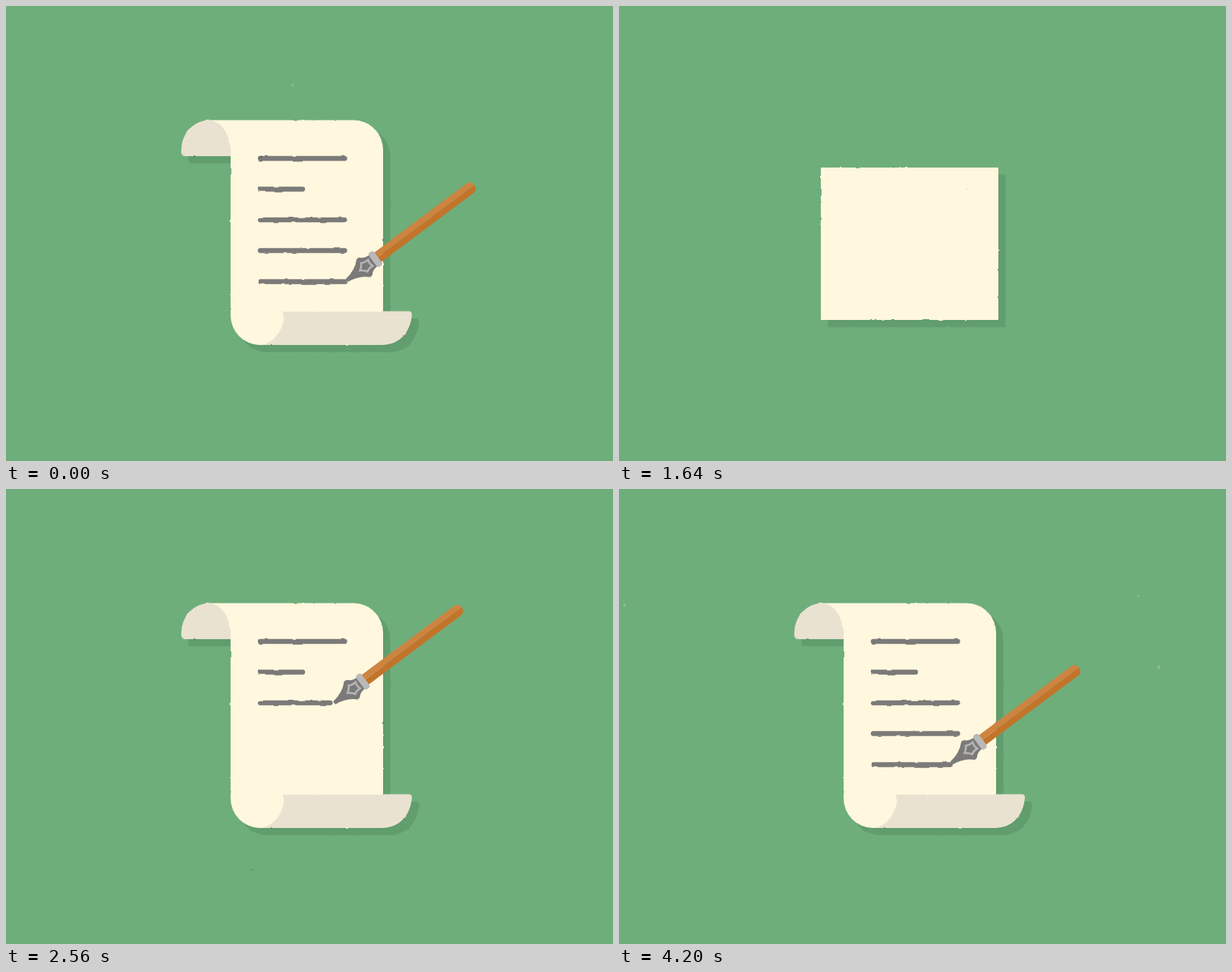
These frames come from a looping animation (800 px wide and 600 px high, 4240 ms). An HTML page:

```html
<!DOCTYPE html>
<html lang="en">
<head>
<meta charset="utf-8">
<title>Scroll and pen</title>
<style>
  html, body { margin: 0; width: 100%; height: 100%; overflow: hidden; background: #6eae7b; }
  svg { display: block; width: 100%; height: 100%; }
</style>
</head>
<body>
<svg viewBox="0 0 800 600">
  <defs>
    <filter id="rough" filterUnits="userSpaceOnUse" x="0" y="0" width="800" height="600" color-interpolation-filters="sRGB">
      <feTurbulence type="fractalNoise" baseFrequency="0.11" numOctaves="2" seed="4"/>
      <feDisplacementMap in="SourceGraphic" scale="2.2" xChannelSelector="R" yChannelSelector="G"/>
    </filter>
    <filter id="inky" filterUnits="userSpaceOnUse" x="0" y="0" width="800" height="600" color-interpolation-filters="sRGB">
      <feTurbulence type="fractalNoise" baseFrequency="0.08" numOctaves="1" seed="9"/>
      <feDisplacementMap in="SourceGraphic" scale="3.4" xChannelSelector="R" yChannelSelector="G"/>
    </filter>
  </defs>
  <rect width="800" height="600" fill="#6eae7b"/>
  <g filter="url(#rough)">
    <g transform="translate(9.5 9.5)"><path id="shadow" fill="#619d6d"/></g>
    <g id="paper">
      <path id="bottomCurl" fill="#eae2d1"/>
      <path id="sheet" fill="#fff7de"/>
      <path id="topCurl" fill="#eae2d1"/>
    </g>
  </g>
  <g id="lines" filter="url(#inky)" fill="none" stroke="#7b7a79" stroke-width="6.3" stroke-linecap="round"></g>
  <g id="pen">
    <path d="M49-7.8H203Q210-7.5 210 0H49Z" fill="#cd8440"/>
    <path d="M49 7.8H203Q210 7.5 210 0H49Z" fill="#c2742a"/>
    <path d="M1-1.5Q18-3.5 28-14L31-13.5Q35-8 45-8V8Q35 8 31 13.5L28 14Q18 3.5 1 1.5Z"
          fill="#7b7a79" stroke="#7b7a79" stroke-width="2" stroke-linejoin="round"/>
    <path d="M22 0Q27-3 29-7Q33-4.5 39-5Q37 0 39 5Q33 4.5 29 7Q27 3 22 0Z" fill="none" stroke="#b5b5b5" stroke-width="2.6"/>
    <rect x="43" y="-11.5" width="8.5" height="23" rx="3.5" fill="#b9b9b9"/>
  </g>
  <g id="specks"></g>
</svg>
<script>
const LOOP = 4240, STEP = 40;
const $ = id => document.getElementById(id);
const clamp = v => Math.max(0, Math.min(1, v));
const mix = (a, b, k) => a + (b - a) * k;
const smooth = k => k * k * (3 - 2 * k);
const part = (t, a, b) => clamp((t - a) / (b - a));

const make = (name, parent) =>
  parent.appendChild(document.createElementNS('http://www.w3.org/2000/svg', name));

const ink = [
  { y: 201, end: 446.5, from: 1840, to: 1960 },
  { y: 241.5, end: 391, from: 2010, to: 2090 },
  { y: 282, end: 445.5, from: 2155, to: 2640 },
  { y: 322.5, end: 446.5, from: 3032, to: 3472 },
  { y: 363.5, end: 446.5, from: 3830, to: 4236 }
].map(line => ({ ...line, node: make('path', $('lines')) }));

// time, tip x, tip y, angle, linear approach
const poses = [
  [0, 449, 362, -36.8],
  [800, 537, 181, 61.2],
  [960, 537, 181, 61.2],
  [1200, 860, 120, 61.2],
  [1720, 830, 60, -36.8],
  [1840, 340, 201, -36.8],
  [1960, 449, 201, -36.8, true],
  [2010, 340, 241, -36.8],
  [2090, 393, 241, -36.8, true],
  [2160, 350, 283, -37],
  [2640, 449, 282, -36.8, true],
  [3032, 338, 322, -36.8],
  [3080, 347, 323, -36.8, true],
  [3472, 449, 322, -36.8, true],
  [3800, 349, 360.5, -36.8],
  [3840, 342, 361, -36.8],
  [4200, 438, 361.5, -36.8, true],
  [4240, 449, 362, -36.8, true]
];

function drawPen(t) {
  const i = poses.findIndex(p => p[0] > t);
  const a = poses[i - 1], b = poses[i];
  const raw = part(t, a[0], b[0]);
  const k = b[4] ? raw : smooth(raw);
  const [x, y, angle] = [1, 2, 3].map(n => mix(a[n], b[n], k));
  $('pen').setAttribute('transform', `translate(${x} ${y}) rotate(${angle})`);
  $('pen').setAttribute('visibility', t >= 1200 && t < 1720 ? 'hidden' : 'visible');
}

function drawPaper(t) {
  const flat = smooth(part(t, 1240, 1520)) - smooth(part(t, 1680, 1880));
  const c = 1 - flat;
  // Each edge's curls collapse onto the plain sheet as c goes to zero.
  const L = x => mix(296, x, c), R = x => mix(497, x, c);
  const T = y => mix(150.5, y, c), B = y => mix(447, y, c);
  const sheet = `M${L(266)} 150.5H${R(458)}A${39 * c} ${39 * c} 0 0 1 497 ${T(190)}V${B(403)}H${L(366)}
    C${L(368)} ${B(425)} ${L(354)} ${B(446)} ${L(334)} 447
    A${39 * c} ${39 * c} 0 0 1 296 ${B(408)}V${T(197)}C296 ${T(172)} ${L(285)} ${T(155)} ${L(266)} 150.5Z`;
  const top = `M${L(268)} 150.5A${37 * c} ${39 * c} 0 0 0 ${L(231)} ${T(190)}V${T(193)}
    Q${L(231)} ${T(198)} ${L(236)} ${T(198)}H296C${L(297)} ${T(174)} ${L(288)} ${T(153)} ${L(268)} 150.5Z`;
  const bottom = `M${L(350)} ${B(402.5)}H${R(531)}Q${R(535)} ${B(402.5)} ${R(535)} ${B(407)}
    C${R(533)} ${B(430)} ${R(519)} 447 ${R(495)} 447H${L(334)}Z`;
  $('sheet').setAttribute('d', sheet);
  $('topCurl').setAttribute('d', c > 0.01 ? top : '');
  $('bottomCurl').setAttribute('d', c > 0.01 ? bottom : '');
  $('shadow').setAttribute('d', c > 0.01 ? sheet + top + bottom : sheet);
  const place = `translate(${mix(396.5, 383, flat)} ${mix(298.75, 313.5, flat)})
    rotate(${-90 * flat}) scale(1 ${mix(1, 234 / 296.5, flat)}) translate(-396.5 -298.75)`;
  $('paper').setAttribute('transform', place);
  $('shadow').setAttribute('transform', place);
}

function drawLines(t) {
  const start = 335;
  for (const { y, end, from, to, node } of ink) {
    const erasing = t < 1240;
    const shown = erasing ? 1 - smooth(part(t, 1040, 1240)) : part(t, from, to);
    const visible = shown > 0 || (!erasing && t >= from);
    node.setAttribute('d', visible ? `M${start} ${y}H${mix(start, end, shown) + 0.01}` : '');
  }
}

const specks = [0, 1, 2].map(() => make('circle', $('specks')));

function drawSpecks(frame) {
  let seed = frame * 7919 + 17;
  const random = () => (seed = (seed * 16807 + 11) % 2147483647) / 2147483647;
  for (let i = 0; i < 5; i++) random();
  for (const dot of specks) {
    dot.setAttribute('cx', random() * 800);
    dot.setAttribute('cy', random() * 600);
    dot.setAttribute('r', 0.6 + 1.8 * random() ** 3);
    dot.setAttribute('fill', random() < 0.5 ? '#fff' : '#000');
    dot.setAttribute('fill-opacity', 0.2);
  }
}

function draw(time) {
  const frame = Math.floor((time % LOOP) / STEP);
  const t = frame * STEP;
  drawPaper(t);
  drawLines(t);
  drawPen(t);
  drawSpecks(frame);
}

const began = performance.now();
function tick() {
  draw(performance.now() - began);
  requestAnimationFrame(tick);
}
tick();
</script>
</body>
</html>
```
